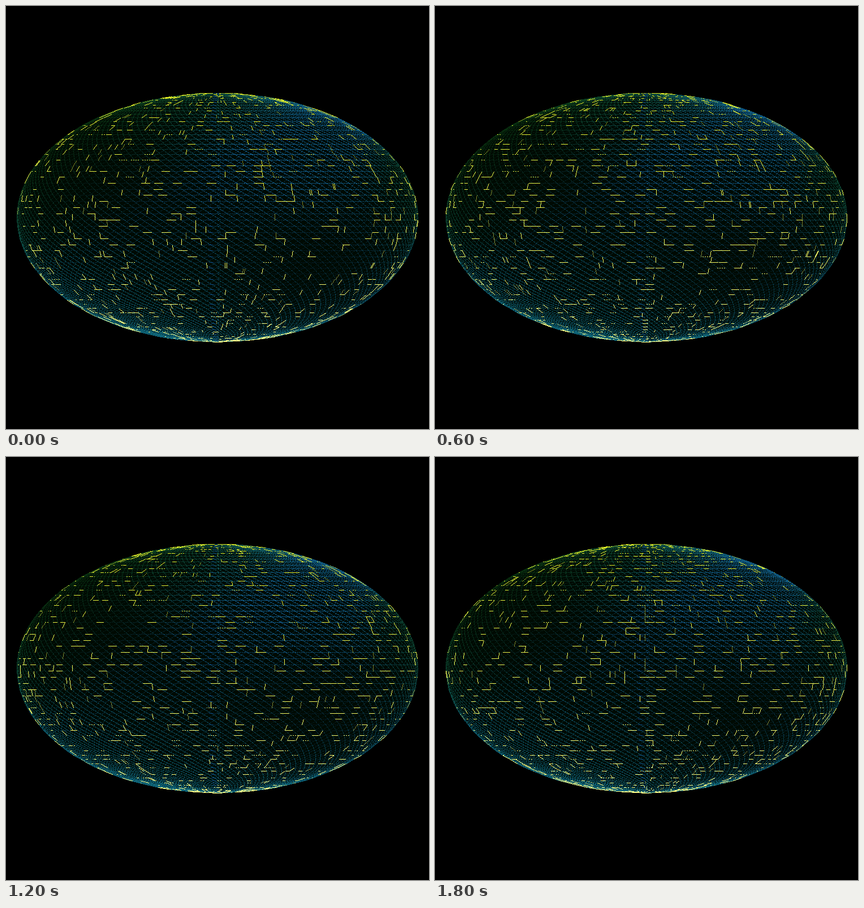
Write an HTML page with a canvas that moves like this. It is 748x748 px and loops after 2 s.

```html
<!DOCTYPE html>
<html lang="en">
<head>
<meta charset="utf-8">
<title>Flickering ellipsoid</title>
<style>
  html, body { margin: 0; width: 100%; height: 100%; overflow: hidden; background: #000; }
  canvas { display: block; }
</style>
</head>
<body>
<canvas id="stage" width="748" height="748"></canvas>
<script>
const SIZE = 748, MID = 374, RX = 354.5, RY = 220;
const STEP = 0.05, ROWS = 62, COLS = 126;
const FRAME_MS = 200, FRAMES = 10;
const ctx = document.getElementById('stage').getContext('2d');

const clamp = v => Math.max(0, Math.min(1, v));
const bump = (u, v, cu, cv, su, sv) =>
  Math.exp(-su * (u - cu) ** 2 - sv * (v - cv) ** 2);

function point(row, col) {
  const phi = row * STEP, theta = col * STEP;
  return {
    x: MID + RX * Math.sin(phi) * Math.sin(theta),
    y: MID + RY * Math.cos(phi)
  };
}

// Hard-edged one-pixel line; keep(i) decides which pixels stay.
function plot(g, a, b, keep = () => true) {
  const x0 = Math.floor(a.x), y0 = Math.floor(a.y);
  const dx = Math.floor(b.x) - x0, dy = Math.floor(b.y) - y0;
  const steps = Math.max(Math.abs(dx), Math.abs(dy), 1);
  for (let i = 0; i < steps; i++) {
    if (keep(i)) g.fillRect(Math.round(x0 + dx * i / steps), Math.round(y0 + dy * i / steps), 1, 1);
  }
}

function meshColor(p, gain) {
  const u = (p.x - MID) / RX, v = (p.y - MID) / RY;
  const sky = bump(u, v, 0.15, -0.45, 2.5, 4);
  const low = clamp(v + 0.15 - u * 0.25);
  const shade = bump(u, v, 0.5, 0.35, 7, 7) + 0.8 * bump(u, v, -0.5, -0.35, 7, 7);
  const green = clamp(-u - v - 0.45) + clamp((u - 0.7) * 3) * clamp(0.5 - v);
  const light = gain * (1 - 0.45 * clamp(shade)) * (1 - 0.35 * clamp(green));
  const blue = 1 - 0.8 * clamp(green);
  const r = 14 + 8 * sky;
  const g = 82 + 30 * sky + 18 * low;
  const b = (112 + 60 * sky + 8 * low) * blue;
  return `rgb(${r * light},${g * light},${b * light})`;
}

function drawMesh() {
  const layer = document.createElement('canvas');
  layer.width = layer.height = SIZE;
  const g = layer.getContext('2d');
  g.fillStyle = '#000';
  g.fillRect(0, 0, SIZE, SIZE);
  g.fillStyle = '#000a02';
  g.beginPath();
  g.ellipse(MID, MID, RX, RY, 0, 0, 7);
  g.fill();
  // Overlapping lines keep the brighter colour instead of piling up at the rim.
  g.globalCompositeOperation = 'lighten';

  for (let row = 0; row <= ROWS; row++) {
    for (let col = 0; col < COLS; col++) {
      const a = point(row, col), b = point(row, col + 1);
      const front = Math.cos((col + 0.5) * STEP) > 0;
      const upperRight = clamp(0.4 + 0.6 * (a.x - MID) / RX - (a.y - MID) / RY);
      g.fillStyle = meshColor(a, (front ? 0.9 : 0.4) * (0.3 + 0.7 * upperRight));
      plot(g, a, b, i => i % 4 < 3);
      if (row) {
        g.fillStyle = meshColor(a, front ? 1 : 0.5);
        plot(g, a, point(row - 1, col + 1), i => (i + col) % 4 !== 3);
      }
    }
    const seam = point(row, COLS - 1);
    g.fillStyle = '#0c3c78';
    plot(g, { x: seam.x - 4, y: seam.y }, { x: seam.x + 4, y: seam.y });
  }
  return layer;
}

function seeded(seed) {
  return () => {
    seed = (seed + 0x6D2B79F5) | 0;
    let t = Math.imul(seed ^ (seed >>> 15), 1 | seed);
    t = (t + Math.imul(t ^ (t >>> 7), 61 | t)) ^ t;
    return ((t ^ (t >>> 14)) >>> 0) / 4294967296;
  };
}

function drawSparks(frame) {
  const random = seeded(frame * 7919 + 17);
  const across = frame ? 0.1 : 0.07, along = frame ? 0.055 : 0.07;
  for (let row = 0; row <= ROWS; row++) {
    for (let col = 0; col < COLS; col++) {
      const a = point(row, col);
      const v = (a.y - MID) / RY;
      ctx.fillStyle = `rgb(${240 + 15 * v},${245 + 10 * v},${85 + 50 * v})`;
      if (random() < across) {
        const broken = Math.abs(v) > 0.3 && col % 3 === 0;
        plot(ctx, a, point(row, col + 1), i => !broken || i % 4 < 2);
      }
      if (random() < along && row < ROWS) {
        const dotted = col % 3 === 0;
        plot(ctx, a, point(row + 1, col), i => !dotted || i % 2 === 0);
      }
    }
  }
}

const mesh = drawMesh();
const start = performance.now();
let shown = -1;

function tick() {
  const frame = Math.floor((performance.now() - start) / FRAME_MS) % FRAMES;
  if (frame !== shown) {
    shown = frame;
    ctx.drawImage(mesh, 0, 0);
    drawSparks(frame);
  }
  requestAnimationFrame(tick);
}
tick();
</script>
</body>
</html>
```
